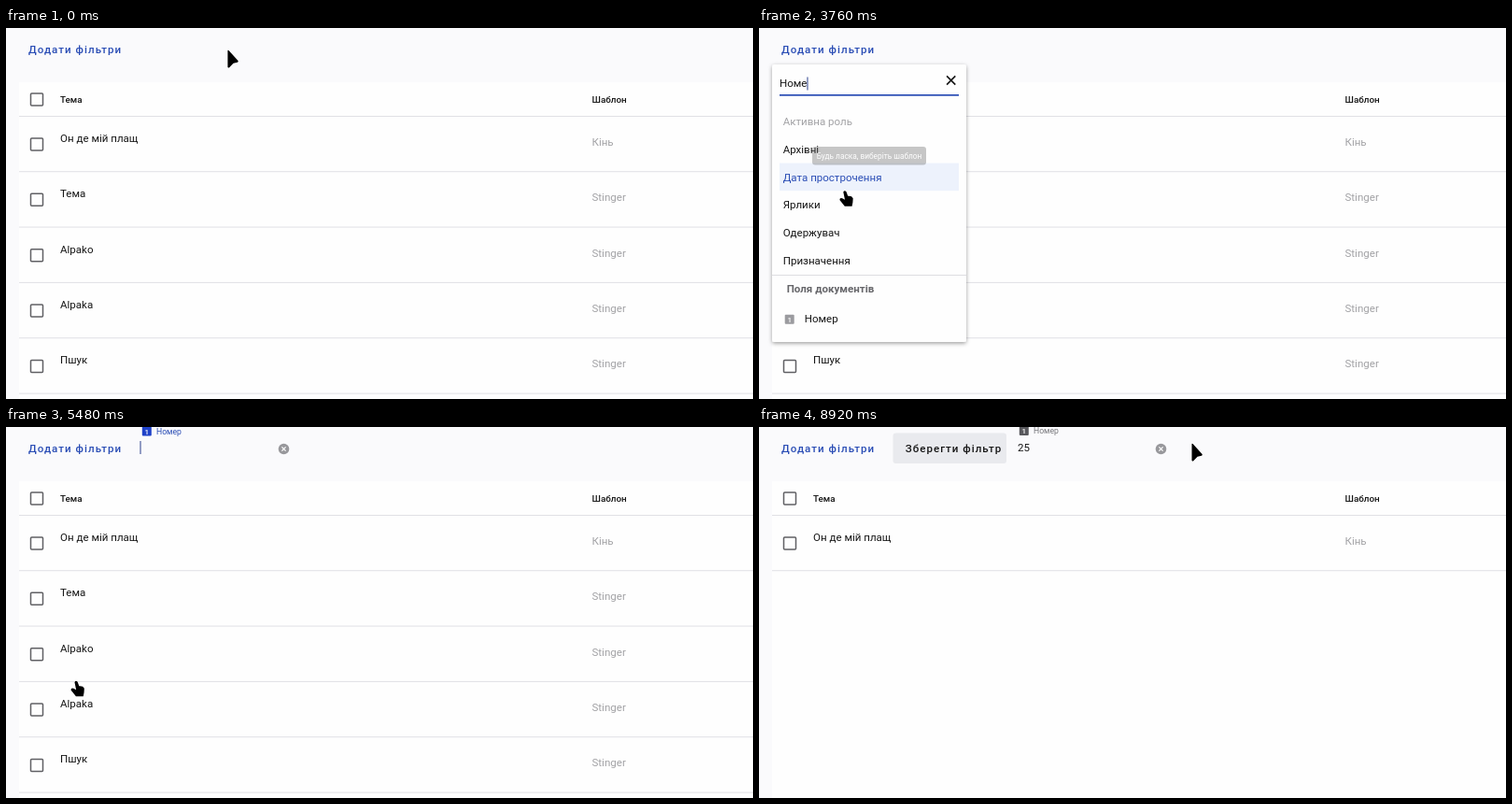
These frames come from a looping animation (800 by 397 pixels, 9.36 s). An HTML page:

```html
<!DOCTYPE html>
<html lang="uk">
<head>
<meta charset="utf-8">
<style>
  html, body { margin: 0; width: 100%; height: 100%; overflow: hidden; background: #fafafc; }
  svg { display: block; font-family: Roboto, sans-serif; font-size: 11.54px; white-space: pre; }
</style>
</head>
<body>
<svg id="stage" width="800" height="397" viewBox="0 0 800 397"></svg>
<script>
const LOOP = 9360, ROW = 59.35, ITEM = 29.66;
const BLUE = '#2a4db5', INK = '#161616', GREY = '#a2a2a5';
const stage = document.getElementById('stage');
const pen = document.createElement('canvas').getContext('2d');

const rows = [['Он де мій плащ', 'Кінь'], ['Тема', 'Stinger'], ['Alpako', 'Stinger'],
  ['Alpaka', 'Stinger'], ['Пшук', 'Stinger']];
const items = ['Активна роль', 'Архівні', 'Дата прострочення', 'Ярлики', 'Одержувач', 'Призначення'];

// [time, x, y] of the pointer's hot spot
const path = [[0, 237, 23], [40, 234, 23], [160, 170, 24], [280, 95, 20], [400, 72, 18],
  [600, 72, 18], [760, 78, 30], [960, 84, 45], [1160, 86, 51], [3640, 86, 51],
  [3720, 92, 120], [3760, 93, 174], [4000, 92, 204], [4300, 86, 250], [4600, 79, 300], [4680, 79, 304],
  [5400, 79, 304], [5480, 76, 273], [5560, 88, 165], [5680, 150, 88], [5840, 205, 52],
  [7800, 205, 52], [8000, 198, 30], [8240, 170, 24], [8440, 230, 32], [8600, 290, 46],
  [8760, 329, 50], [8840, 410, 36], [8920, 463, 17]];

const within = (t, a, b) => t >= a && t < b;
const clamp = v => Math.max(0, Math.min(1, v));
const ramp = (t, start, length) => clamp((t - start) / length);

// Value of the last [time, value] pair that has been reached
const latest = (steps, t) => steps.reduce((v, [at, next]) => t >= at ? next : v, '');

function pointerAt(t) {
  const i = path.findIndex(p => p[0] > t);
  if (i < 0) return path[path.length - 1].slice(1);
  const [t0, x0, y0] = path[i - 1], [t1, x1, y1] = path[i], k = (t - t0) / (t1 - t0);
  return [x0 + (x1 - x0) * k, y0 + (y1 - y0) * k];
}

const text = (x, y, s, fill = INK, extra = '') => `<text x="${x}" y="${y}" fill="${fill}" ${extra}>${s}</text>`;
const rect = (x, y, w, h, fill, extra = '') =>
  `<rect x="${x}" y="${y}" width="${w}" height="${h}" fill="${fill}" ${extra}/>`;
const group = (opacity, body) => opacity > 0 ? `<g opacity="${opacity}">${body}</g>` : '';
const cross = (x, y, r, color, width) =>
  `<path d="M${x - r} ${y - r}l${2 * r} ${2 * r}m0 ${-2 * r}l${-2 * r} ${2 * r}" stroke="${color}" stroke-width="${width}"/>`;
const checkbox = y => rect(26.5, y - 6.5, 13, 13, 'none', 'rx="1" stroke="#606064" stroke-width="1.5"');
const line = y => rect(14, y - .5, 786, 1, '#e0e0e5');
const button = (x, s, fill) => text(x, 26.5, s, fill, 'font-weight="500" letter-spacing="1.03"');
const badge = (x, y, fill) => rect(x, y, 10, 10, fill, 'rx="1"') +
  text(x + 5, y + 8, 1, '#fff', 'font-size="8" font-weight="500" text-anchor="middle"');
const tooltip = (x, y, w, s, opacity) => group(opacity,
  rect(x, y, w, 19.5, '#616161', 'rx="3"') +
  text(x + w / 2, y + 13, s, '#fff', 'font-size="8.3" text-anchor="middle"'));

function caret(x, y, s) {
  pen.font = '11.54px Roboto, sans-serif';
  return rect(x + pen.measureText(s).width, y, 1, 14, '#2a3f8c');
}

function table(count) {
  const head = 'font-weight="500" font-size="9.88"';
  let out = rect(14, 58, 786, 339, '#fefefe') + checkbox(76.5) + line(94.5) +
    text(58, 80.3, 'Тема', INK, head) + text(627.5, 80.3, 'Шаблон', INK, head);
  rows.slice(0, count).forEach(([topic, template], i) => {
    const y = i * ROW;
    out += checkbox(124.5 + y) + text(58, 122 + y, topic) +
      text(627.5, 126 + y, template, GREY) + line(153.7 + y);
  });
  return out;
}

function popup(t, y) {
  const full = t >= 2880, hover = within(t, 3700, 5040) ? y : 0;
  const query = latest([[1360, 'Н'], [1600, 'Но'], [1720, 'Ном'], [1800, 'Номе'], [1880, 'Номер'], [2680, 'Номе']], t);
  const caretOff = [[2320, 2680], [2920, 3440], [3940, 4440], [4940, 5200]].some(([a, b]) => within(t, a, b));
  let out = rect(14, 39, 208, full ? 297 : 283, '#fefefe', 'rx="2.5" filter="url(#shadow)"') +
    rect(22, 71, 192, 1.7, BLUE) + text(22, 63.3, query);
  if (query) out += cross(205.7, 56, 4.6, INK, 1.6);
  if (!caretOff) out += caret(22, 52.5, query);

  items.forEach((name, i) => {
    const top = 85.2 + i * ITEM, on = i > 0 && within(hover, top, top + ITEM);
    if (on) out += rect(22, top, 192, ITEM, '#edf2fc');
    out += text(25.7, top + 19, name, on ? BLUE : i ? INK : GREY);
  });

  if (full) {
    const on = hover > 294.5;
    if (on) out += rect(22, 294.5, 192, 34.5, '#edf2fc');
    out += rect(14, 264, 208, 1, '#dedee2') +
      text(29.7, 283.2, 'Поля документів', '#66666a', 'font-weight="700"') +
      badge(27.7, 306.8, '#9b9b9f') + text(48.7, 315.3, 'Номер', on ? BLUE : INK);
  } else {
    out += text(21.7, 286.3, 'Почніть вводити назву поля, щоб', GREY) + text(21.7, 300.3, 'почати пошук', GREY);
  }
  return out;
}

function field(t) {
  const done = t >= 6880, x = done ? 277 : 144, top = done ? -1 : -.5;
  const value = latest([[6160, '2'], [6320, '25']], t);
  let out = badge(x + 1.8, top, done ? '#58585c' : '#1f42c8') +
    text(x + 17, top + 8, 'Номер', done ? '#77777b' : BLUE, 'font-size="8.65"') +
    text(x, 25.8, value) +
    `<circle cx="${x + 153.5}" cy="23.5" r="5.8" fill="#98989c"/>` + cross(x + 153.5, 23.5, 2.1, '#fff', 1.2);
  if (!done && !within(t, 5800, 6160)) out += caret(x - .5, 15, value);
  if (done) out += rect(143.5, 6.5, 121.5, 32.5, '#e9eaee', 'rx="3"') + button(156.7, 'Зберегти фільтр', INK);
  return out;
}

function pointer(t, x, y) {
  const hand = within(t, 270, 700) || within(t, 3700, 5540) || within(t, 7960, 8480);
  const shape = hand
    ? 'M-2.7 1.4Q-1.6-1 .4.8L2.2 5.6Q6.6 5.2 7.7 8L7.4 12.5 6.6 16.5H-1.2L-6.6 9.8Q-6.6 7.2-3.8 8.2L-1 9.6Z'
    : 'M.5 1Q.8.3 1.6 1L11.6 12Q12.3 13.3 11 13.8L6.6 14.8 2 19.4Q.6 20 .5 18.8Z';
  return `<path transform="translate(${x} ${y})" d="${shape}" fill="#000" stroke="#fff"
    stroke-width="1.2" stroke-linejoin="round" paint-order="stroke"/>`;
}

const shadow = `<filter id="shadow" x="-10%" y="-10%" width="120%" height="120%">
  <feDropShadow dx="0" dy="1.5" stdDeviation="2" flood-opacity=".38"/></filter>`;

function draw(now) {
  const t = now % LOOP, [x, y] = pointerAt(t);
  const open = Math.min(ramp(t, 580, 120), 1 - ramp(t, 5040, 100));
  const hint = .4 * Math.min(ramp(t, 3680, 40), 1 - ramp(t, 3740, 160));
  const name = Math.min(.9 * ramp(t, 4620, 280), 1 - ramp(t, 5000, 80));
  stage.innerHTML = shadow + table(t >= 6960 ? 1 : 5) + button(24, 'Додати фільтри', BLUE) +
    group(ramp(t, 5200, 120), field(t)) +
    (open > 0 ? group(open, popup(t, y)) : '') +
    tooltip(57, 127, 122, 'Будь ласка, виберіть шаблон', hint) +
    tooltip(99, 340.7, 36.5, 'Номер', name) +
    pointer(t, x, y);
}

const start = performance.now();
function tick() {
  draw(performance.now() - start);
  requestAnimationFrame(tick);
}
tick();
</script>
</body>
</html>
```
